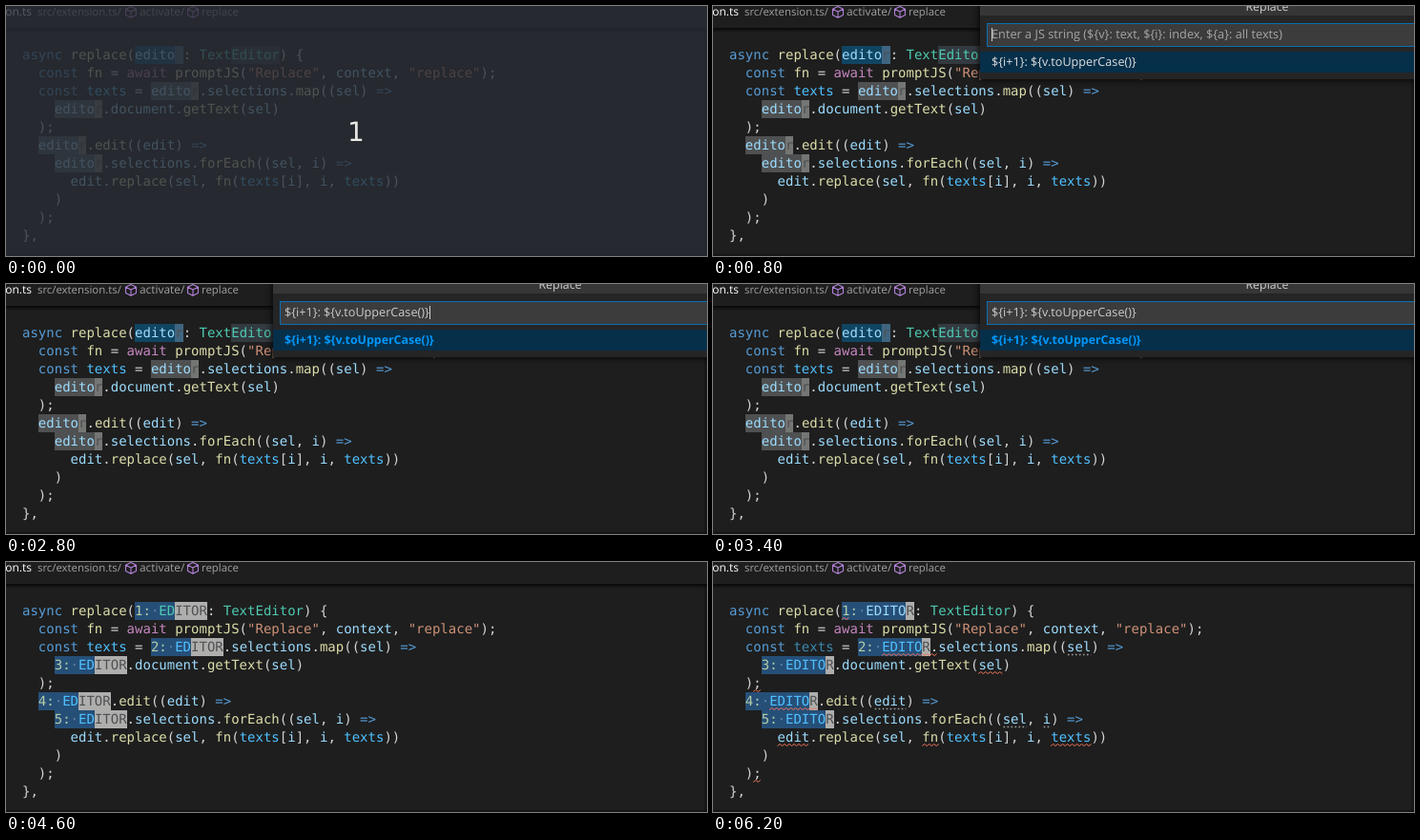
An HTML page that plays this animation: 735x263 px, repeating every 6300 ms.

```html
<!DOCTYPE html>
<html lang="en">
<head>
<meta charset="utf-8">
<title>Replace selections</title>
<style>
  html, body { margin: 0; width: 100%; height: 100%; overflow: hidden; background: #1e1e1e; }
  svg { display: block; width: 735px; height: 263px; }
  text { white-space: pre; text-rendering: geometricPrecision; }
  .code { font: 14px "DejaVu Sans Mono", monospace; }
  .ui { font-family: "Open Sans", "Noto Sans", sans-serif; }
</style>
</head>
<body>
<svg id="stage" viewBox="0 0 735 263" xmlns="http://www.w3.org/2000/svg">
  <defs>
    <linearGradient id="down" x2="0" y2="1">
      <stop stop-color="#000" stop-opacity=".75"/><stop offset="1" stop-color="#000" stop-opacity="0"/>
    </linearGradient>
    <linearGradient id="right">
      <stop stop-color="#000" stop-opacity="0"/><stop offset="1" stop-color="#000" stop-opacity=".4"/>
    </linearGradient>
    <filter id="blur" x="-10%" y="-30%" width="120%" height="160%"><feGaussianBlur stdDeviation="3.5"/></filter>
  </defs>
  <rect width="735" height="263" fill="#1e1e1e"/>
  <g id="header" class="ui" font-size="11.4" fill="#a0a0a0">
    <text x="27" y="10" font-size="12" text-anchor="end" fill="#fff">on.ts</text>
    <text x="33" y="10">src/extension.ts/</text>
    <text x="140" y="10" font-size="11.9">activate/</text>
    <text x="205" y="10">replace</text>
    <path id="cubes" fill="none" stroke="#b180d7" stroke-width="1.1" stroke-linejoin="round"/>
  </g>
  <rect y="23" width="735" height="5" fill="url(#down)"/>
  <rect x="731" y="23" width="4" height="240" fill="url(#right)"/>
  <g id="editor"></g>
  <rect y="261" width="735" height="2" fill="#000" opacity=".3"/>
  <g id="popup" class="ui"></g>
  <g id="countdown">
    <rect width="735" height="263" fill="#282c34" opacity=".78"/>
    <text x="367" y="142" text-anchor="middle" font-size="28" font-family="DejaVu Sans, sans-serif" fill="#e8e8e4">1</text>
  </g>
</svg>
<script>
const LOOP = 6300, CELL = 8.428, LEFT = 17, TOP = 42, LINE = 19;
const byId = id => document.getElementById(id);

const colors = {
  b: '#569cd6', f: '#dcdcaa', v: '#9cdcfe', t: '#4ec9b0', c: '#4fc1ff',
  p: '#c586c0', s: '#ce9178', w: '#d4d4d4', n: '#b5cea8',
  k: '#515052', d: '#6482a0', u: '#3c88ae'
};

// "~x" switches to colour x; "@" stands for the selected name.
const lines = [
  '~basync ~freplace~w(@~w: ~tTextEditor~w) {',
  '  ~bconst ~ffn~w = ~pawait ~fpromptJS~w(~s"Replace"~w, ~vcontext~w, ~s"replace"~w);',
  '  ~bconst ~ctexts~w = @~w.~vselections~w.~fmap~w((~vsel~w) ~b=>',
  '    @~w.~vdocument~w.~fgetText~w(~vsel~w)',
  '  ~w);',
  '  @~w.~fedit~w((~vedit~w) ~b=>',
  '    @~w.~vselections~w.~fforEach~w((~vsel~w, ~vi~w) ~b=>',
  '      ~vedit~w.~freplace~w(~vsel~w, ~ffn~w(~ctexts~w[~vi~w], ~vi~w, ~ctexts~w))',
  '    ~w)',
  '  ~w);',
  '~w},'
];
const selections = [[0, 14], [2, 16], [3, 4], [5, 2], [6, 4]];
const errors = [[0, 14, 1], [2, 19, 7], [3, 31, 3], [4, 3, 1], [5, 5, 6],
  [7, 6, 4], [7, 24, 2], [7, 40, 5], [9, 3, 1]];
const hints = [[2, 42, 3], [5, 18, 4], [6, 34, 3], [6, 39, 1]];

const colX = col => LEFT + col * CELL;
const rowY = row => TOP + row * LINE;
const rect = (x, y, w, h, fill, more = '') =>
  `<rect x="${x}" y="${y}" width="${w}" height="${h}" fill="${fill}" ${more}/>`;
const cells = (row, col, count, fill) => {
  const x = Math.round(colX(col));
  return rect(x, rowY(row), Math.round(colX(col + count)) - x, LINE, fill);
};
const label = (x, y, size, fill, text, more = '') =>
  `<text x="${x}" y="${y}" font-size="${size}" fill="${fill}" ${more}>${text}</text>`;

function codeLine(row, source) {
  const spans = source.split('~').map((part, i) => {
    const text = i ? part.slice(1) : part;
    return `<tspan fill="${colors[part[0]] || colors.w}">${text.replace(/>/g, '&gt;')}</tspan>`;
  });
  return `<text class="code" x="${LEFT}" y="${rowY(row) + 14}">${spans.join('')}</text>`;
}

function squiggle([row, col, count]) {
  const x = colX(col), y = rowY(row) + 17.5, end = colX(col + count);
  let path = `M${x} ${y + 1}`;
  for (let i = 1; x + i * 2.5 <= end + 1; i++) path += `L${x + i * 2.5} ${y + (i % 2 ? -1 : 1)}`;
  return `<path d="${path}" fill="none" stroke="#f0745a" stroke-width="1"/>`;
}

const dots = ([row, col, count]) =>
  `<path d="M${colX(col) + 1} ${rowY(row) + 17.5}H${colX(col + count)}" stroke="#a0a0a0" stroke-width="1.6" stroke-dasharray="1.6 2.4"/>`;

function selectedName(state, index) {
  if (!state.replaced) return '~vedito~kr';
  const color = index ? 'c' : state.analysed ? 'v' : 't';
  const split = state.wide ? 2 : 5;
  return `~n${index + 1}:~d·~${color}${'EDITOR'.slice(0, split)}~k${'EDITOR'.slice(split)}`;
}

function drawEditor(state) {
  let out = state.replaced ? '' : cells(0, 26, 6, '#333a40');
  selections.forEach(([row, col], i) => {
    if (state.replaced) {
      const block = state.wide ? 4 : 1, end = Math.round(colX(col + 9));
      out += cells(row, col, 9, '#264f78') + cells(row, col + 9 - block, block, '#aeafad');
      if (state.cursorOff) out += rect(end - 3, rowY(row), 3, LINE, '#264f78');
    } else {
      const first = i === 0;
      const back = state.popup ? (first ? '#104562' : '#4f5051') : (first ? '#0b4b74' : '#495560');
      out += cells(row, col, 5, back) + cells(row, col + 5, 1, first ? '#3f6580' : '#747674');
    }
  });
  lines.forEach((source, row) => {
    const index = selections.findIndex(s => s[0] === row);
    let text = source.replace('@', () => selectedName(state, index));
    if (state.analysed && row === 2) text = text.replace('~ctexts', '~utexts');
    out += codeLine(row, text);
  });
  if (state.errors) out += errors.map(squiggle).join('');
  if (state.analysed) out += hints.map(dots).join('');
  return out;
}

function drawPopup(state) {
  if (!state.popup) return '';
  const value = '${i+1}: ${v.toUpperCase()}';
  const hint = 'Enter a JS string (${v}: text, ${i}: index, ${a}: all texts)';
  let out = rect(279, -12, 480, 90, '#000', 'filter="url(#blur)" opacity=".8"')
    + rect(280, 0, 455, 77, '#252526') + rect(280, 0, 455, 10, '#363637')
    + label(581, 5, 12.4, '#cccccc', 'Replace', 'text-anchor="middle"')
    + rect(287.5, 18.5, 460, 24, '#3c3c3c', 'stroke="#0b70b5"')
    + rect(280, 48, 455, 22, '#062f4a');
  out += state.filled
    ? label(292, 34, 12.65, '#cccccc', value) + label(292, 63, 12.4, '#0097fb', value, 'font-weight="700"')
    : label(292, 34, 12.75, '#a6a6a6', hint) + label(292, 63, 12.65, '#e0e0e0', value);
  if (state.caret) out += rect(state.filled ? 444 : 292, 23, 1, 14, '#d0d0d0');
  return out;
}

function stateAt(t) {
  const within = (from, to) => t >= from && t < to;
  return {
    countdown: t < 400,
    popup: within(800, 4600),
    filled: t >= 2800,
    caret: !within(1400, 2000) && !within(3400, 4000),
    replaced: t >= 4600,
    wide: within(4600, 4700),
    errors: t >= 5000,
    analysed: t >= 5100,
    cursorOff: within(5800, 6200)
  };
}

byId('cubes').setAttribute('d', [131, 196].map(x =>
  `M${x} .5l5.5 2.7v6.2l-5.5 2.8l-5.5-2.8v-6.2zM${x - 5.5} 3.2l5.5 2.8l5.5-2.8M${x} 6v6.2`).join(''));

let shown = '';
function render(t) {
  const state = stateAt(t), key = JSON.stringify(state);
  if (key === shown) return;
  shown = key;
  byId('editor').innerHTML = drawEditor(state);
  byId('popup').innerHTML = drawPopup(state);
  byId('countdown').style.display = state.countdown ? '' : 'none';
}

const start = performance.now();
function tick() {
  render((performance.now() - start) % LOOP);
  requestAnimationFrame(tick);
}
tick();
</script>
</body>
</html>
```
